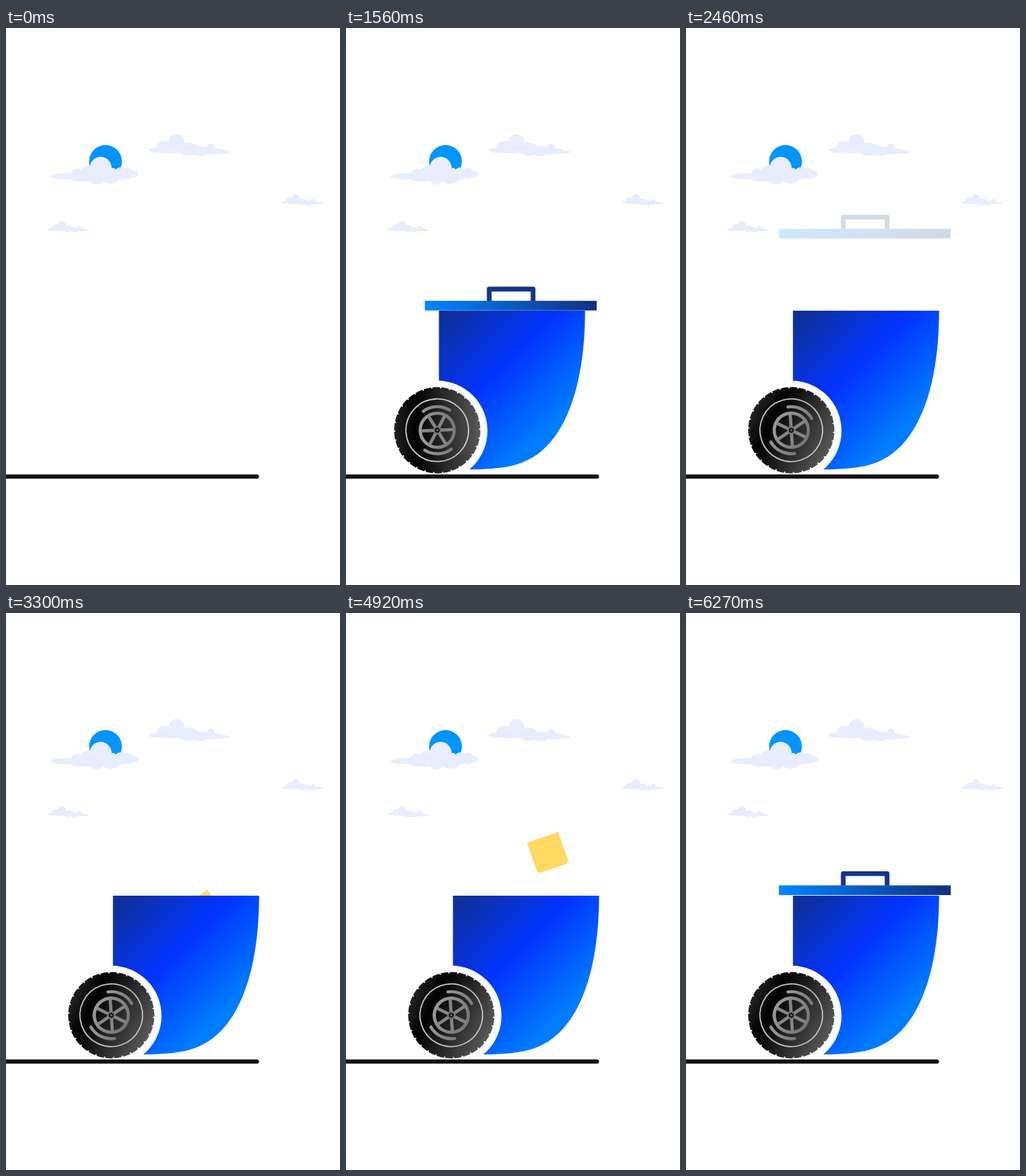
An HTML page that plays this animation: 480x800 px, repeating every 6.3 s.

```html
<!DOCTYPE html>
<html lang="en">
<head>
<meta charset="utf-8">
<title>Rolling bin</title>
<style>
  html, body { margin: 0; width: 100%; height: 100%; overflow: hidden; background: #fff; }
  svg { display: block; width: 100%; height: 100%; }
</style>
</head>
<body>
<svg viewBox="0 0 480 800">
  <defs>
    <linearGradient id="bodyFill" gradientUnits="userSpaceOnUse" x1="165" y1="410" x2="322" y2="568">
      <stop stop-color="#103099"/><stop offset=".5" stop-color="#0033ff"/><stop offset="1" stop-color="#007dff"/>
    </linearGradient>
    <linearGradient id="lidFill">
      <stop stop-color="#0086ff"/><stop offset="1" stop-color="#142e82"/>
    </linearGradient>
    <linearGradient id="tyreFill">
      <stop stop-color="#222"/><stop offset=".25" stop-color="#000"/><stop offset="1" stop-color="#585858"/>
    </linearGradient>
    <linearGradient id="metal" gradientUnits="userSpaceOnUse" x1="-34" y1="0" x2="34" y2="0">
      <stop stop-color="#a0a0a0"/><stop offset="1" stop-color="#707070"/>
    </linearGradient>
    <path id="cup" d="M-19-19H19V14Q19 19 14 19H-14Q-19 19-19 14Z" fill="#ffda63"/>
    <g id="cloud"></g>
  </defs>

  <circle cx="143" cy="191.7" r="23.6" fill="#0094ff"/>
  <g fill="#e8edff">
    <g id="sunCloud"></g>
    <use href="#cloud"/>
    <use href="#cloud" transform="translate(60 277) scale(.51) translate(-205 -152)"/>
    <use href="#cloud" transform="translate(396.3 238.5) scale(.51) translate(-205 -152)"/>
  </g>

  <g id="items"></g>
  <g id="bin">
    <path d="M153.7 406H363.7C363.7 520 332 606 268 626Q245 634 195 634H153.7Z" fill="url(#bodyFill)"/>
    <circle cx="151.5" cy="578.5" r="72" fill="#fff"/>
    <g id="wheel" fill="none" stroke="url(#metal)">
      <circle r="62" fill="url(#tyreFill)" stroke="none"/>
      <circle r="61.5" stroke="#fff" stroke-width="2.6" pathLength="360" stroke-dasharray="1.8 10.2"/>
      <circle r="45" stroke="#c4c4c4" stroke-width="1.8"/>
      <circle r="24.5" stroke-width="4.6"/>
      <g id="spokes" stroke-width="4.6"></g>
      <path id="arcs" stroke-width="4.4" stroke-linecap="round"/>
      <circle r="6" fill="#777" stroke="none"/>
      <circle r="3.6" fill="#151515" stroke="none"/>
      <circle r="1.4" fill="#777" stroke="none"/>
    </g>
    <g id="lid">
      <path d="M226 392V375H289V392" fill="none" stroke="#14358c" stroke-width="6.8" stroke-linejoin="round"/>
      <rect x="133.5" y="391.8" width="247" height="13.9" fill="url(#lidFill)"/>
    </g>
  </g>
  <path d="M-10 644.2H360.6" stroke="#111" stroke-width="6" stroke-linecap="round"/>
</svg>
<script>
const LOOP = 6300;
const $ = id => document.getElementById(id);
const clamp = p => Math.min(1, Math.max(0, p));
const span = (t, from, to) => clamp((t - from) / (to - from));
const smooth = p => p * p * (3 - 2 * p);
const mix = (a, b, s) => a + (b - a) * s;

// Clouds are unions of ellipses: cx, cy, rx, ry
const fillCloud = (id, lobes) => $(id).innerHTML = lobes.map(([x, y, rx, ry]) =>
  `<ellipse cx="${x}" cy="${y}" rx="${rx}" ry="${ry}"/>`).join('');
fillCloud('sunCloud', [
  [136, 202, 16, 17], [85, 213, 21, 4.3], [102, 211, 9, 9], [118, 209, 12, 11], [110, 215, 20, 5.5],
  [130, 215, 10, 10], [150, 213, 14, 10.5], [154, 206, 4, 5], [165, 209, 10, 9], [175, 209, 8, 8], [181, 210, 9, 5]
]);
fillCloud('cloud', [
  [245, 164, 11.5, 11.5], [228, 171, 12, 9], [218, 175.5, 13, 3.5], [239, 175, 19, 5],
  [262, 174, 14, 9.5], [280, 177, 12, 7], [294, 174, 6, 8], [300, 177, 14, 4], [309, 178, 13, 2.5]
]);

$('spokes').innerHTML = [0, 60, 120, 180, 240, 300].map(a =>
  `<path d="M5 0H23" transform="rotate(${a})" stroke="#858585"/>`).join('');
$('arcs').setAttribute('d', 'M-19-28A34 34 0 0 1 19-28M19 28A34 34 0 0 1-19 28');

// Start and end pose: x, y, angle
const items = [
  { time: [2670, 3500], from: [290, 363, 0], to: [282, 442, -40], size: 1.25 },
  { time: [3560, 4520], from: [350, 312, 0], to: [291, 434, 35], size: 1 },
  { time: [4480, 5390], from: [314, 256, 0], to: [264, 442, -40], size: 1.25 }
];
for (const item of items) {
  item.el = document.createElementNS('http://www.w3.org/2000/svg', 'use');
  item.el.setAttribute('href', '#cup');
  $('items').append(item.el);
}

function drawItem({ time: [start, end], from, to, size, el }, t) {
  const s = smooth(span(t, start, end));
  const [x, y, angle] = from.map((v, i) => mix(v, to[i], s));
  el.setAttribute('transform', `translate(${x} ${y}) rotate(${angle}) scale(${size})`);
  el.setAttribute('opacity', t < end ? span(t, start, start + 100) : 0);
}

function drawLid(t) {
  const opening = t < 4000;
  const lift = opening ? smooth(span(t, 1830, 2645)) : 1 - smooth(span(t, 5310, 6310));
  const alpha = opening ? 1 - span(t, 1830, 2600) : span(t, 5380, 6220);
  $('lid').setAttribute('transform', `translate(0 ${-119 * lift})`);
  $('lid').setAttribute('opacity', alpha);
}

function draw(now) {
  const t = now % LOOP;
  const x = -383 * (1 - smooth(span(t, 0, 1812)));
  $('bin').setAttribute('transform', `translate(${x} 0)`);
  $('wheel').setAttribute('transform', `translate(151.3 577.7) rotate(${26 + 1.4 * x})`);
  drawLid(t);
  items.forEach(item => drawItem(item, t));
}

let begin;
function tick(now) {
  begin ??= now;
  draw(now - begin);
  requestAnimationFrame(tick);
}
draw(0);
requestAnimationFrame(tick);
</script>
</body>
</html>
```
